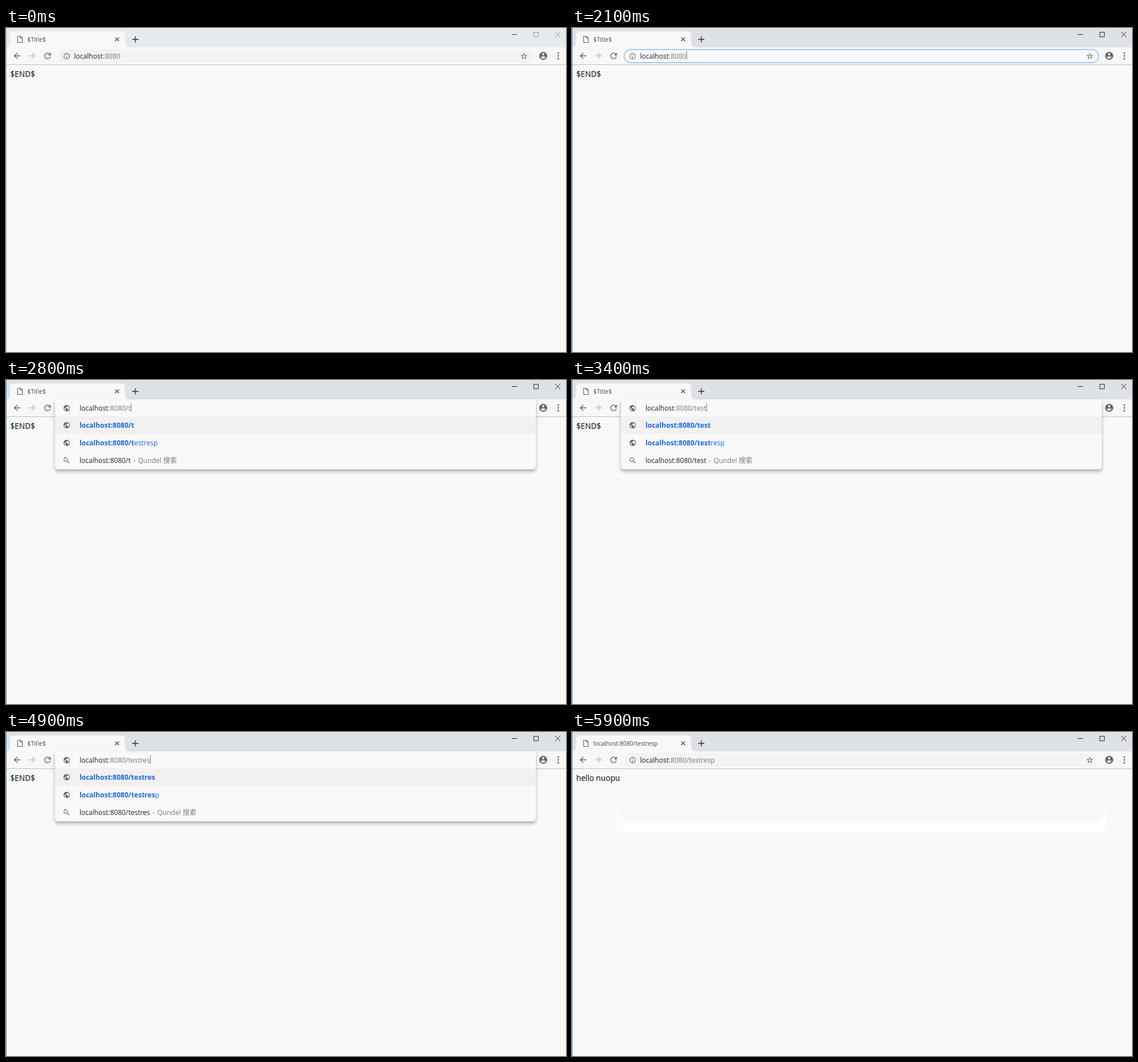
Recreate the animation shown at these times as an HTML page. Size 983 px wide and 570 px high, loop 7.7 s.

```html
<!DOCTYPE html>
<html lang="en">
<head>
<meta charset="utf-8">
<title>Address bar</title>
<style>
  html, body { margin: 0; width: 100%; height: 100%; overflow: hidden; background: #f8f8f8; }
  svg { display: block; width: 100%; height: 100%; }
  text { font: 12.05px "Open Sans", "Noto Sans CJK SC", "Noto Sans CJK", sans-serif; white-space: pre; fill: #222; }
  .title { font-size: 10.4px; fill: #45494d; }
  .page { font-size: 13.7px; fill: #000; }
  .dim { fill: #777b80; }
  .link { fill: #1a67e2; }
  .bold { font-weight: 700; }
  .selected, .selected .dim { fill: #fff; }
  .panel { filter: drop-shadow(0 4px 3px rgba(0, 0, 0, .3)); }
</style>
</head>
<body>
<svg id="stage" viewBox="0 0 983 570"></svg>
<script>
const LOOP = 7700;
const HOST = "localhost:8080";
const PATH = "/testresp";
const KEY_TIMES = [2300, 2800, 3000, 3200, 3400, 4500, 4700, 4900, 5300];
const CARET_ON = [[1100, 1600], [2100, 3900], [4300, 5600]];
const ROW = 31, PANEL_TOP = 34, LIST_TOP = 64;

// Icon outlines on a 24-unit grid, centred on (12, 12).
const ICONS = {
  arrow: "M20 11H7.83l5.59-5.59L12 4l-8 8 8 8 1.41-1.41L7.83 13H20z",
  reload: "M17.65 6.35A7.96 7.96 0 0 0 12 4a8 8 0 1 0 7.73 10h-2.08A6 6 0 1 1 12 6c1.66 0 3.14.69 4.22 1.78L13 11h7V4z",
  info: "M11 7h2v2h-2zm0 4h2v6h-2zm1-9a10 10 0 1 0 0 20 10 10 0 0 0 0-20zm0 18a8 8 0 1 1 0-16 8 8 0 0 1 0 16z",
  star: "M22 9.24l-7.19-.62L12 2 9.19 8.63 2 9.24l5.46 4.73L5.82 21 12 17.27 18.18 21l-1.63-7.03zM12 15.4l-3.76 2.27 1-4.28-3.32-2.88 4.38-.38L12 6.1l1.71 4.04 4.38.38-3.32 2.88 1 4.28z",
  account: "M12 2a10 10 0 1 0 0 20 10 10 0 0 0 0-20zm0 3a3 3 0 1 1 0 6 3 3 0 0 1 0-6zm0 14.2a7.2 7.2 0 0 1-6-3.22c.03-1.99 4-3.08 6-3.08s5.97 1.09 6 3.08a7.2 7.2 0 0 1-6 3.22z",
  globe: "M12 2a10 10 0 1 0 0 20 10 10 0 0 0 0-20zm-1 17.93A8 8 0 0 1 4.21 10.21L9 15v1a2 2 0 0 0 2 2zm6.9-2.54A2 2 0 0 0 16 16h-1v-3a1 1 0 0 0-1-1H8v-2h2a1 1 0 0 0 1-1V7h2a2 2 0 0 0 2-2v-.41a8 8 0 0 1 2.9 12.8z",
  search: "M15.5 14h-.79l-.28-.27a6.5 6.5 0 1 0-.7.7l.27.28v.79l5 4.99L20.49 19zm-6 0a4.5 4.5 0 1 1 0-9 4.5 4.5 0 0 1 0 9z"
};

const icon = (name, x, y, scale, color = "#5f6368", flip = 1) =>
  `<path d="${ICONS[name]}" fill="${color}" transform="translate(${x} ${y}) scale(${scale * flip} ${scale}) translate(-12 -12)"/>`;
const rect = (x, y, w, h, fill, extra = "") =>
  `<rect x="${x}" y="${y}" width="${w}" height="${h}" fill="${fill}" ${extra}/>`;
const line = (d, color, width = 1) =>
  `<path d="${d}" fill="none" stroke="${color}" stroke-width="${width}"/>`;
const text = (x, y, content, extra = "") => `<text x="${x}" y="${y}" ${extra}>${content}</text>`;
const span = (cls, content) => `<tspan class="${cls}">${content}</tspan>`;
const dash = '<tspan class="dim" dx="1.2"> -</tspan><tspan dx="1.2"> </tspan>';

function windowFrame(t) {
  const active = t >= 700;
  const button = active ? "#222" : "#929497";
  const title = t >= 5700 ? HOST + PATH : "$Title$";
  return rect(0, 0, 983, 570, "#f8f8f8")
    + rect(0, 0, 983, 34, active ? "#dee1e6" : "#e7eaed")
    + '<path d="M-1 34Q7 34 7 26V14Q7 6 15 6H201Q209 6 209 14V26Q209 34 217 34Z" fill="#f8f8f8"/>'
    + line("M20.5 14.5h5l3 3v8h-8zM25 14.5v3.5h3.5", "#5f6368", 1.1)
    + text(37.5, 24, title, 'class="title"')
    + line("M191.7 16.7l6.6 6.6m0-6.6l-6.6 6.6", "#4a4d51", 1.4)
    + line("M227 14.7v10.6M221.7 20h10.6", "#4f5357", 1.8)
    + line("M888 11.5h9", t < 100 ? "#333" : button)
    + line("M926.5 7.5h8v8h-8z", button)
    + line("M964 7l9 9m0-9l-9 9", button)
    + rect(0, 64, 983, 1, "#bcbdbf")
    + rect(0, 0, 1, 570, active ? "#4d9edc" : "#b0b1b3")
    + icon("arrow", 19.3, 49, .7)
    + icon("arrow", 46, 49, .7, "#b9bbbe", -1)
    + icon("reload", 73, 49, .72)
    + icon("account", 943, 49, .7)
    + [44, 49, 54].map(y => `<circle cx="969.5" cy="${y}" r="1.5" fill="#5f6368"/>`).join("")
    + text(7.5, 85.5, t >= 5800 ? "hello nuopu" : "$END$", 'class="page"');
}

function addressBar(t) {
  const focused = t >= 800 && t < 2300;
  const selected = t >= 800 && t < 1100;
  const path = t >= 5600 ? PATH : "";
  const pill = focused
    ? rect(91.5, 38, 833, 23, "#fafafa", 'rx="11.5" stroke="#a9c7f5" stroke-width="1.8"')
    : rect(92, 37.5, 832, 23.5, "#f1f3f4", 'rx="11.75"');
  return pill
    + icon("info", 106.5, 49.5, .54)
    + icon("star", 909, 49.5, .58)
    + (selected ? rect(120, 41, 82, 17, "#0078d7") : "")
    + text(119.5, 53.5, "localhost" + span("dim", ":8080" + path),
      `id="url" ${selected ? 'class="selected"' : ""}`);
}

function suggestions(typed) {
  const entered = HOST + typed;
  const search = ["search", entered + dash + span("dim", "Qundel 搜索")];
  if (typed === PATH) {
    return [["globe", span("bold", entered) + dash + span("link bold", entered)], search];
  }
  const completion = ["globe", span("link bold", entered) + span("link", PATH.slice(typed.length))];
  if (typed === "/") {
    return [
      ["globe", "$Title$" + dash + span("link bold", HOST)],
      completion,
      search,
      ["globe", "$Title$" + dash + span("link bold", entered) + span("link", "index.jsp")]
    ];
  }
  return [["globe", span("link bold", entered)], completion, search];
}

function dropdown(typed) {
  const rows = suggestions(typed);
  const bottom = LIST_TOP + rows.length * ROW;
  const halo = rect(80, 66, 856, bottom - 50, "#fafafa", 'rx="8"');
  const panel = `<path class="panel" fill="#f9f9f9" d="M86 ${PANEL_TOP}H930V${bottom - 6}q0 6-6 6H92q-6 0-6-6z"/>`;
  const list = rows.map(([symbol, content], i) => {
    const middle = LIST_TOP + ROW * i + 15.5;
    return icon(symbol, 106.5, middle, symbol === "search" ? .6 : .55) + text(129, middle + 4.7, content);
  }).join("");
  return halo + panel
    + rect(86, LIST_TOP, 844, ROW, "#f1f1f1")
    + icon("globe", 106.5, 49.5, .55)
    + text(129, 53.5, "localhost" + span("dim", ":8080" + typed), 'id="url"')
    + list;
}

// Pale outline left behind when the taller list closes.
const afterglow = '<path fill="#fdfdfd" d="M78 134Q78 137 86 142V149q0 8 8 8H922q8 0 8-8V142Q938 137 938 134V165q0 10-10 10H88q-10 0-10-10z"/>';

function scene(t) {
  const typed = PATH.slice(0, KEY_TIMES.filter(k => k <= t).length);
  const open = t >= 2300 && t < 5600;
  const caret = CARET_ON.some(([from, to]) => t >= from && t < to);
  return windowFrame(t)
    + (t >= 5300 ? afterglow : "")
    + (open ? dropdown(typed) : addressBar(t))
    + (caret ? rect(0, 41, 1, 15, "#777", 'id="caret"') : "");
}

const stage = document.getElementById("stage");
let shown = "";

function render(now) {
  const markup = scene(now % LOOP);
  if (markup !== shown) {
    stage.innerHTML = shown = markup;
    const caret = document.getElementById("caret");
    if (caret) {
      const url = document.getElementById("url");
      caret.setAttribute("x", Math.round(+url.getAttribute("x") + url.getComputedTextLength()));
    }
  }
}

const start = performance.now();
function tick() {
  render(performance.now() - start);
  requestAnimationFrame(tick);
}
tick();
</script>
</body>
</html>
```
